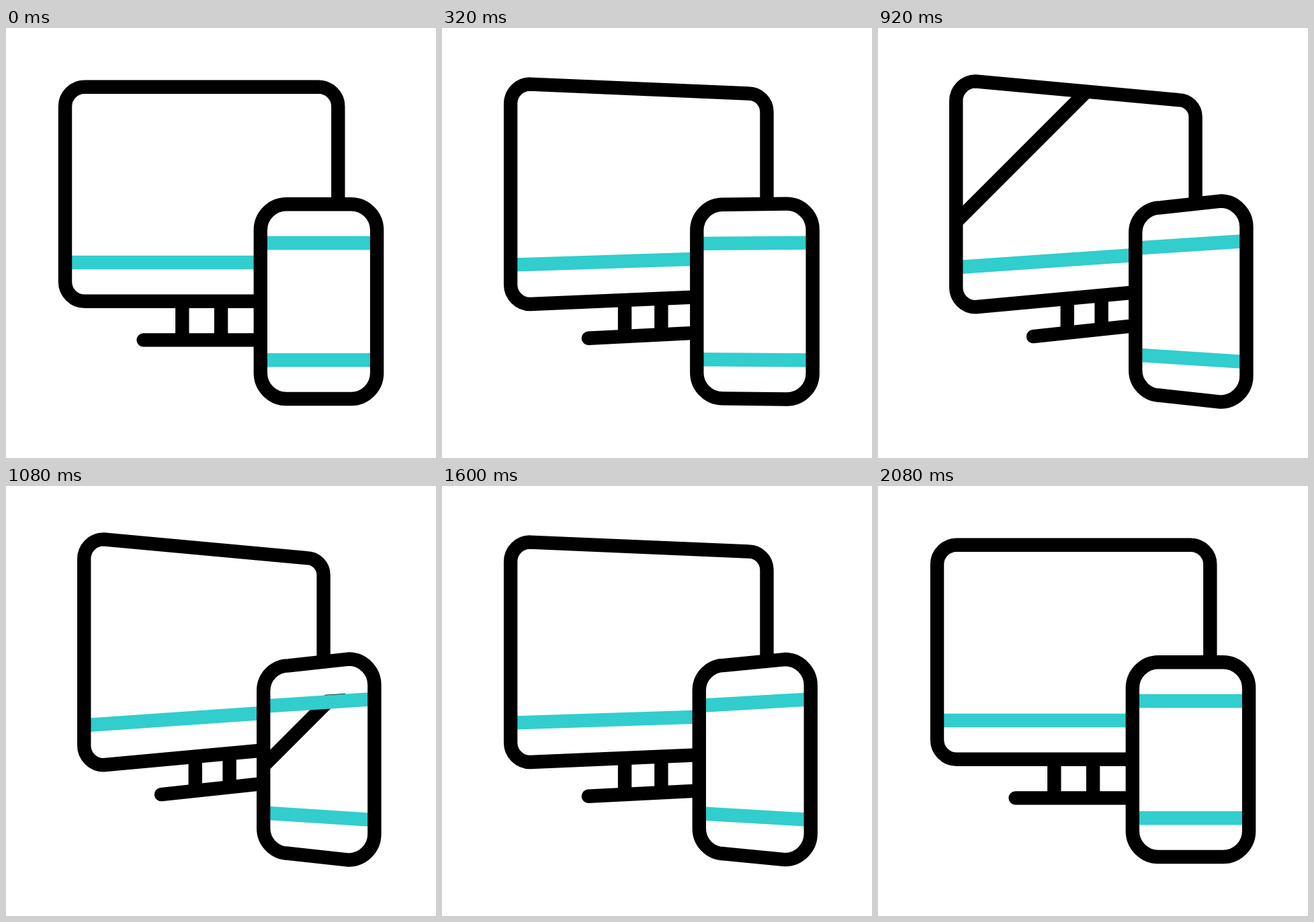
An HTML page with a canvas for the animation above (2560 ms loop, 640 px wide and 640 px high).

```html
<!DOCTYPE html>
<html lang="en">
<head>
<meta charset="utf-8">
<title>Desktop and phone</title>
<style>
html, body { margin: 0; width: 100%; height: 100%; overflow: hidden; background: #fff; }
canvas { display: block; width: 640px; height: 640px; }
</style>
</head>
<body>
<canvas id="stage" width="640" height="640"></canvas>
<script>
const ctx = document.getElementById('stage').getContext('2d');
const LOOP = 2560, STEP = 40, WIDTH = 20.4;
const BLACK = '#000', TEAL = '#32cdcd';

// A device is a rounded box. When tilted, its sides move to `sides` and its
// heights about the middle are scaled at the left and right end.
const SCREEN = {
  left: 88, right: 494.3, top: 87.8, bottom: 406.8, radius: 29,
  bars: [349], field: [87.8, 349],
  sides: [116.2, 472.6], edgeScale: [1.053, 0.879], barScale: [1.071, 0.83],
  turn: [0, 640], back: [1280, 1920], sweep: [640, 1280], path: [183, 864]
};
const PHONE = {
  left: 378.8, right: 552.1, top: 262.2, bottom: 552, radius: 38.6,
  bars: [320, 494.2], field: [320, 494.2],
  sides: [383.2, 548.4], edgeScale: [0.964, 1.032], barScale: [0.911, 1.034],
  turn: [130, 750], back: [1400, 2080], sweep: [800, 1440], path: [675, 1059]
};

const mix = (a, b, k) => a + (b - a) * k;

// Strong symmetric ease: cubic-bezier(.667, 0, .333, 1)
function ease(x) {
  if (x <= 0) return 0;
  if (x >= 1) return 1;
  let lo = 0, hi = 1, s = 0.5;
  for (let i = 0; i < 30; i++) {
    s = (lo + hi) / 2;
    const r = 1 - s;
    if (2 * s * r * r + s * s * r + s * s * s < x) lo = s; else hi = s;
  }
  return s * s * (3 - 2 * s);
}
const progress = (t, [from, to]) => ease((t - from) / (to - from));
const tilt = (d, t) => progress(t, d.turn) - progress(t, d.back);

const side = (d, i, k) => mix(i ? d.right : d.left, d.sides[i], k);
function height(d, y, scale, k) {
  const mid = (d.top + d.bottom) / 2;
  return mid + (y - mid) * mix(1, scale, k);
}
const bar = (d, y, k) => [0, 1].flatMap(i => [side(d, i, k), height(d, y, d.barScale[i], k)]);

function outline(d, k) {
  const p = new Path2D();
  // Corners clockwise from top left: side, vertical direction, start on the side?
  for (const [i, low] of [[0, 0], [1, 0], [1, 1], [0, 1]]) {
    const x = side(d, i, k);
    const y = height(d, low ? d.bottom : d.top, d.edgeScale[i], k);
    const r = d.radius * mix(1, Math.min(1, d.edgeScale[i]), k), h = r * 0.448;
    const sx = i ? -1 : 1, sy = low ? -1 : 1;
    if (i === low) {
      p.lineTo(x, y + sy * r);
      p.bezierCurveTo(x, y + sy * h, x + sx * h, y, x + sx * r, y);
    } else {
      p.lineTo(x + sx * r, y);
      p.bezierCurveTo(x + sx * h, y, x, y + sy * h, x, y + sy * r);
    }
  }
  p.closePath();
  return p;
}

function line([x1, y1, x2, y2], color, cap = 'butt') {
  ctx.strokeStyle = color;
  ctx.lineCap = cap;
  ctx.beginPath();
  ctx.moveTo(x1, y1);
  ctx.lineTo(x2, y2);
  ctx.stroke();
}

// Diagonal gleam where x + y = c, kept inside the device's field
function gleam(d, t, k) {
  if (t <= d.sweep[0] || t >= d.sweep[1]) return;
  const c = mix(...d.path, progress(t, d.sweep));
  const [a, b] = d.field.map(y => bar(d, y, k));
  const pad = WIDTH / 2 + 0.9;
  ctx.save();
  ctx.beginPath();
  ctx.moveTo(a[0], a[1] - pad);
  ctx.lineTo(a[2], a[3] - pad);
  ctx.lineTo(b[2], b[3] + pad);
  ctx.lineTo(b[0], b[1] + pad);
  ctx.clip();
  line([c - 640, 640, c, 0], BLACK);
  ctx.restore();
}

function drawDevice(d, t) {
  const k = tilt(d, t), shape = outline(d, k);
  ctx.fillStyle = '#fff';
  ctx.fill(shape);
  ctx.save();
  ctx.clip(shape);
  gleam(d, t, k);
  d.bars.forEach(y => line(bar(d, y, k), TEAL));
  ctx.restore();
  ctx.strokeStyle = BLACK;
  ctx.stroke(shape);
}

function drawStand(k) {
  const foot = u => [291.2 + u + k * (16 - 0.12 * u), 464.4 - k * (13.4 + 0.093 * u)];
  line([...foot(-86.6), ...foot(86.6)], BLACK, 'round');
  for (const u of [-28.9, 28.9]) {
    const [x, y] = foot(u);
    line([x, y, x, y - mix(57.5, 51, k)], BLACK);
  }
}

function draw(t) {
  ctx.fillStyle = '#fff';
  ctx.fillRect(0, 0, 640, 640);
  ctx.lineWidth = WIDTH;
  ctx.lineJoin = 'round';
  drawDevice(SCREEN, t);
  drawStand(tilt(SCREEN, t));
  drawDevice(PHONE, t);
}

const start = performance.now();
function tick() {
  const t = (performance.now() - start) % LOOP;
  draw(Math.floor(t / STEP) * STEP);
  requestAnimationFrame(tick);
}
tick();
</script>
</body>
</html>
```
